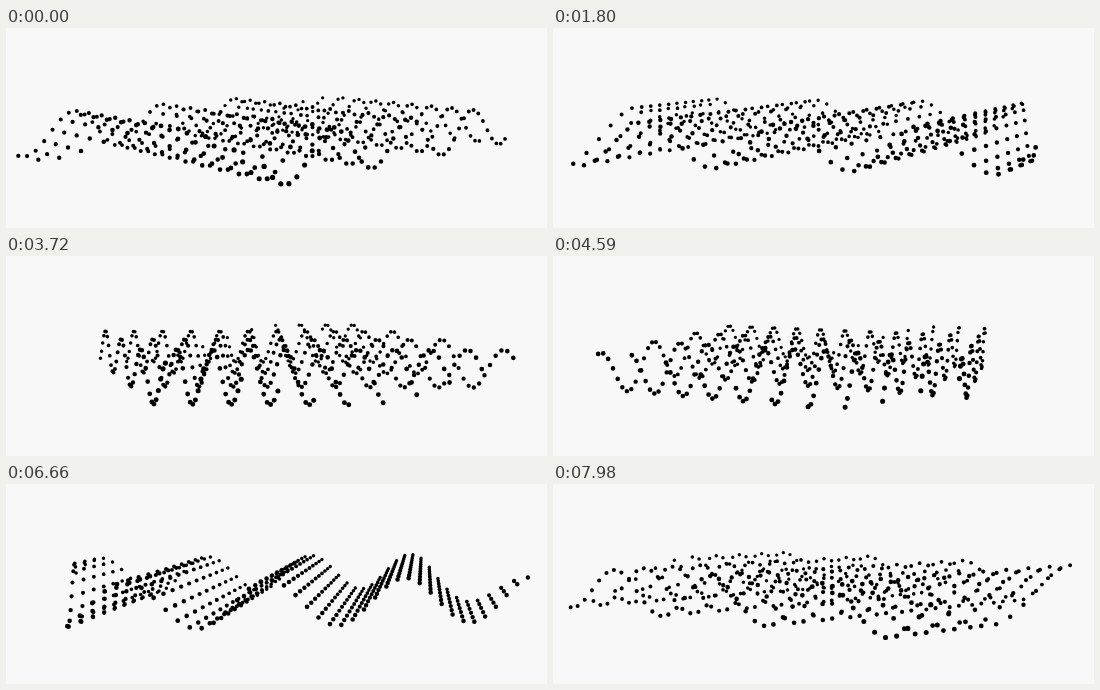
Recreate the animation shown at these times as an HTML page with a canvas. Size 541x200 px, loop 8000 ms.

```html
<!DOCTYPE html>
<html lang="en">
<head>
<meta charset="utf-8">
<title>Dot wave</title>
<style>
  html, body { margin: 0; width: 100%; height: 100%; overflow: hidden; background: #f8f8f8; }
  canvas { display: block; width: 541px; height: 200px; }
</style>
</head>
<body>
<canvas width="541" height="200"></canvas>
<script>
  const canvas = document.querySelector('canvas');
  const ctx = canvas.getContext('2d');
  const LOOP = 8000, STEP = 30, HELD_AT = 6090;
  const DISTANCE = 1000, CENTER_X = 270.5, HORIZON = 5;
  const EYE_HEIGHT = 97, AMPLITUDE = 19.8, DOT = 2;
  const rad = degrees => degrees * Math.PI / 180;

  function draw(turn) {
    const cos = Math.cos(rad(51 - turn));
    const sin = Math.sin(rad(51 - turn));
    ctx.fillStyle = '#f8f8f8';
    ctx.fillRect(0, 0, canvas.width, canvas.height);
    ctx.fillStyle = '#000';
    ctx.beginPath();
    for (let i = -20; i <= 20; i++) {
      for (let j = -5; j <= 5; j++) {
        const u = i * 10, v = j * 30;
        const x = u * cos + v * sin;
        const z = u * sin - v * cos;
        const drop = EYE_HEIGHT + AMPLITUDE * Math.cos(rad(30 * (i + j) + 9 + turn));
        const scale = DISTANCE / (DISTANCE + z);
        const px = CENTER_X + x * scale;
        const py = HORIZON + drop * scale;
        const r = DOT * scale;
        ctx.moveTo(px + r, py);
        ctx.arc(px, py, r, 0, 2 * Math.PI);
      }
    }
    ctx.fill();
  }

  // One degree per step; a single step is held for twice as long.
  function frame() {
    const time = performance.now() % LOOP;
    draw(Math.floor(time / STEP) - (time >= HELD_AT ? 1 : 0));
    requestAnimationFrame(frame);
  }
  frame();
</script>
</body>
</html>
```
